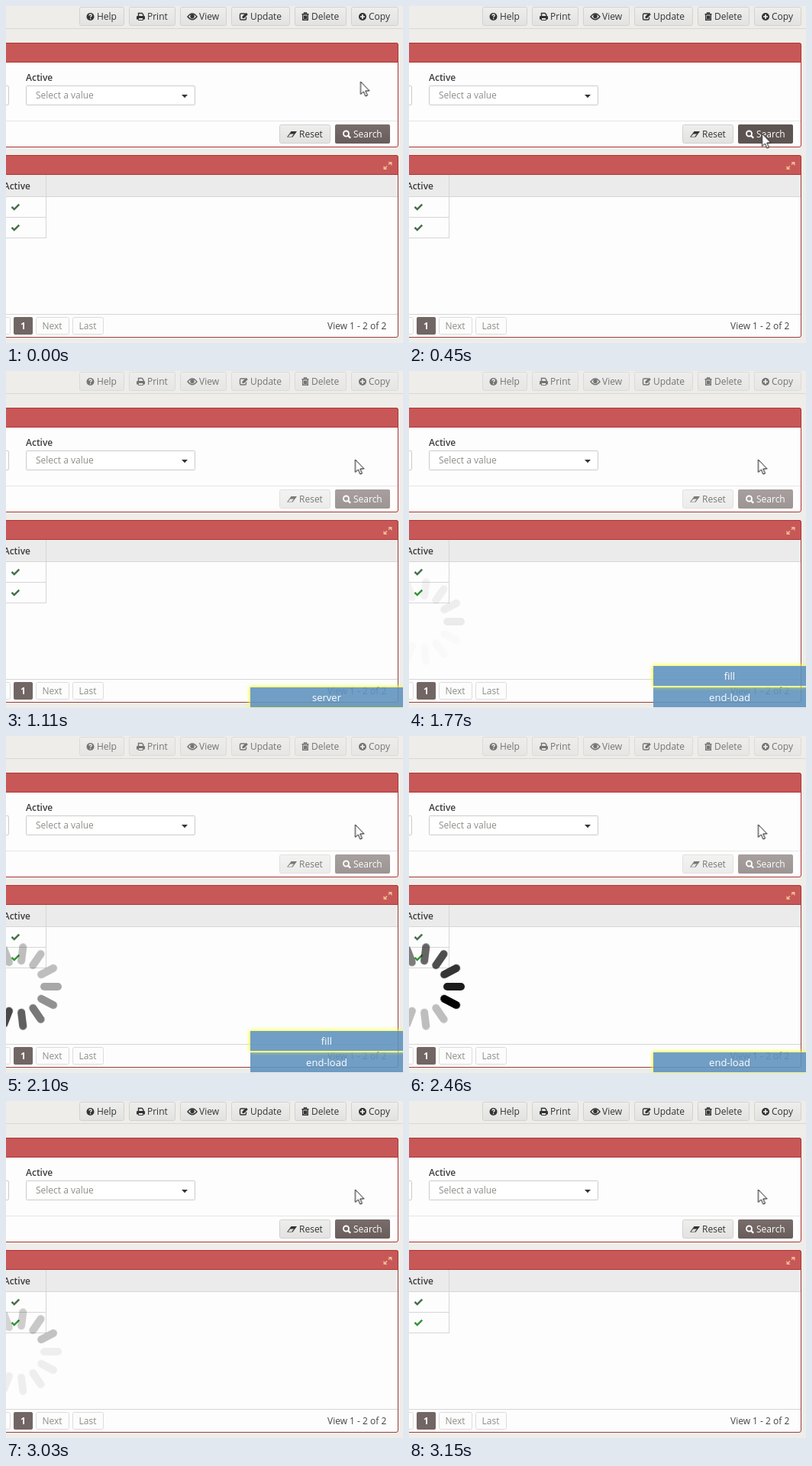
Recreate the animation shown at these times as an HTML page. Size 520 by 441 pixels, loop 3.9 s.

```html
<!DOCTYPE html>
<html lang="en">
<head>
<meta charset="utf-8">
<title>Grid search</title>
<style>
  html, body { margin: 0; width: 100%; height: 100%; overflow: hidden; background: #eeedea; }
  #stage { position: relative; width: 520px; height: 441px; overflow: hidden; }
  svg { position: absolute; left: 0; top: 0; }
  svg, .event { font: 12px "Open Sans", sans-serif; }

  .btn rect { fill: url(#light); stroke: #d2d1cf; }
  .btn, .ink { fill: #333; }
  .line { fill: none; stroke: #333; stroke-width: 1.4; }
  .bold { font-weight: 600; fill: #3c3c3c; }
  .muted { fill: #8b8f87; }
  .head { fill: #c75857; stroke: #b03434; }
  .rule { fill: none; stroke: #d6d6d6; }
  .check { fill: none; stroke: #466f49; stroke-width: 2.5; }
  .page { fill: #fcfcfc; stroke: #dcdcdc; }

  .lock, .hover, .cursor, .fresh, .event, .loader { animation: 3900ms step-end infinite; }
  .lock { animation-name: lock; }
  .hover { animation-name: hover; }
  .fresh { animation-name: fresh; }
  .cursor { animation-name: cursor; animation-timing-function: ease-in-out; }
  .loader { animation-name: loader; animation-timing-function: linear; }
  .loader rect { animation: spoke 650ms linear infinite; }

  .event {
    position: absolute; left: 320px; top: 414px; width: 200px; height: 26px;
    background: rgba(98, 148, 190, .9); color: #fff;
    font-size: 13px; line-height: 26px; text-align: center; visibility: hidden;
  }
  .glow { box-shadow: 0 0 5px 1px #ffff28; }
  .server { animation-name: server; }
  .fill { top: 386px; animation-name: fill; }
  .end { animation-name: end; }

  @keyframes lock { 0% { opacity: 1 } 12.3% { opacity: .65 } 73.07% { opacity: 1 } }
  @keyframes hover { 0% { fill: url(#dark) } 8% { fill: #5d5452 } 21.5% { fill: url(#dark) } }
  @keyframes fresh { 0% { stroke: #466f49 } 45.38% { stroke: #349536 } }
  @keyframes server { 0% { visibility: hidden } 12.3% { visibility: visible } 45.38% { visibility: hidden } }
  @keyframes fill { 0% { visibility: hidden } 45.38% { visibility: visible } 59.23% { visibility: hidden } }
  @keyframes end {
    0% { visibility: hidden; box-shadow: none }
    45.38% { visibility: visible; box-shadow: none }
    59.23% { visibility: visible; box-shadow: 0 0 5px 1px #ffff28 }
    73.07% { visibility: hidden; box-shadow: none }
  }
  @keyframes cursor {
    0%, .4% { transform: translate(464.5px, 99px) }
    11.5%, 18% { transform: translate(462.5px, 167px) }
    28.4%, 100% { transform: translate(457.5px, 116px) }
  }
  @keyframes loader { 0%, 44.87% { opacity: 0 } 52.5%, 70% { opacity: 1 } 80.2%, 100% { opacity: 0 } }
  @keyframes spoke { 0% { opacity: 1 } 60%, 100% { opacity: .25 } }
</style>
</head>
<body>
<div id="stage">
<svg width="520" height="441" viewBox="0 0 520 441">
  <defs>
    <linearGradient id="light" x2="0" y2="1"><stop stop-color="#eeeeed"/><stop offset="1" stop-color="#e2e2e1"/></linearGradient>
    <linearGradient id="dark" x2="0" y2="1"><stop stop-color="#786d6a"/><stop offset="1" stop-color="#685d5b"/></linearGradient>
  </defs>
  <rect width="520" height="441" fill="#eeedea"/>
  <path d="M0 29.5H520" stroke="#d9d8d5"/>

  <!-- toolbar -->
  <g class="lock">
    <g class="btn">
      <rect x="96.5" y="1.5" width="58" height="24" rx="2"/>
      <circle cx="110.5" cy="14" r="5"/>
      <path d="M108.9 12.6q.1-1.6 1.7-1.6t1.6 1.4q0 .8-.9 1.2-.7.4-.7 1.2M110.6 15.8v1.5" fill="none" stroke="#eee" stroke-width="1.3"/>
      <text x="119" y="18">Help</text>
    </g>
    <g class="btn">
      <rect x="161.5" y="1.5" width="60" height="24" rx="2"/>
      <path d="M171 14.2q0-1.2 1.2-1.2h8.6q1.2 0 1.2 1.2V17.500h-11z"/>
      <path class="line" d="M173.500 13V9.500h4.500l1.800 1.800V13" stroke-width="1.2"/>
      <path d="M173.500 15.500h6v3h-6z" fill="#eee" stroke="#333"/>
      <text x="185" y="18">Print</text>
    </g>
    <g class="btn">
      <rect x="228.500" y="1.500" width="60" height="24" rx="2"/>
      <path class="line" d="M238 14q6-8 12 0q-6 7.500-12 0z" stroke-width="1.2"/>
      <circle cx="244" cy="13.500" r="2.700"/>
      <text x="253" y="18">View</text>
    </g>
    <g class="btn">
      <rect x="295.500" y="1.500" width="76" height="24" rx="2"/>
      <path class="line" d="M313 10h-5q-1.500 0-1.500 1.500v5q0 1.500 1.500 1.500h5q1.500 0 1.500-1.500v-2" stroke-width="1.2"/>
      <path d="M309.500 16v-2.300l5-5 2.300 2.300-5 5z"/>
      <text x="320" y="18">Update</text>
    </g>
    <g class="btn">
      <rect x="378.500" y="1.500" width="67" height="24" rx="2"/>
      <path class="line" d="M387.500 10.700h9M390.500 10.500v-1.500h3v1.500M388.700 11v7.300h6.600V11M390.700 12.500v4.500M392.100 12.500v4.500M393.500 12.500v4.500" stroke-width="1"/>
      <text x="400" y="18">Delete</text>
    </g>
    <g class="btn">
      <rect x="452.500" y="1.500" width="61" height="24" rx="2"/>
      <circle cx="467" cy="14" r="5"/>
      <path d="M464 14h6M467 11v6" stroke="#eee" stroke-width="1.700"/>
      <text x="475" y="18">Copy</text>
    </g>
  </g>

  <!-- criteria -->
  <rect x="-9.500" y="48.500" width="523" height="136" rx="2.500" fill="#fdfdfd" stroke="#b03434"/>
  <path class="head" d="M-9 73.500V48.500H511q2.500 0 2.500 2.500v22.500z"/>
  <text class="bold" x="26" y="98">Active</text>
  <g fill="#fff" stroke="#cbcbcb">
    <rect x="-9.500" y="104.500" width="13" height="25" rx="1"/>
    <rect x="26.500" y="104.500" width="221" height="25" rx="1"/>
  </g>
  <text class="muted" x="39" y="121">Select a value</text>
  <path class="ink" d="M230 116h8l-4 4.200z"/>
  <path d="M0 150.500H513" stroke="#e6e6e6"/>
  <g class="lock">
    <g class="btn">
      <rect x="358.500" y="155.500" width="66" height="24" rx="2"/>
      <path d="M368 171.500l5.500-7.500h7.500l-5.500 7.500z"/>
      <path d="M369.500 171l2.700-3.600h4.800l-2.700 3.600z" fill="#ddd"/>
      <text x="384" y="172">Reset</text>
    </g>
    <rect class="hover" x="431" y="155" width="72" height="25" rx="2"/>
    <g fill="#fff">
      <circle cx="445.500" cy="167" r="3.500" fill="none" stroke="#fff" stroke-width="1.900"/>
      <path d="M448 169.600l3.200 3.200" stroke="#fff" stroke-width="2.200"/>
      <text x="455" y="172">Search</text>
    </g>
  </g>

  <!-- grid -->
  <rect x="-9.500" y="195.500" width="523" height="238" rx="2.500" fill="#fdfdfd" stroke="#99403c"/>
  <path d="M0 221H513V249H0z" fill="#ebebeb"/>
  <path class="head" d="M-9 220.500V195.500H511q2.500 0 2.500 2.500v22.500z"/>
  <g fill="#efbd94">
    <path d="M500.500 204h5v5zM499.500 214h-5v-5z"/>
    <path d="M496 212.500l3-3M501 207.500l3-3" stroke="#efbd94" stroke-width="1.600"/>
  </g>
  <path class="rule" d="M0 249.500H513M0 276.500H52.500M0 303.500H52.500M52.500 221V304M0 403.500H513"/>
  <text class="bold" x="32" y="240" text-anchor="end">Active</text>
  <path class="check" d="M7.500 262.800l3.300 3.300 6.400-6.400"/>
  <path class="check fresh" d="M7.500 289.800l3.300 3.300 6.400-6.400"/>
  <g class="page">
    <rect x="-9.500" y="407.500" width="15" height="22" rx="2"/>
    <rect x="39.500" y="407.500" width="43" height="22" rx="2"/>
    <rect x="87.500" y="407.500" width="40" height="22" rx="2"/>
  </g>
  <rect x="10" y="407" width="25" height="23" rx="2" fill="#71676a" style="fill:#716664"/>
  <text x="22.500" y="423" text-anchor="middle" fill="#fff" font-weight="700">1</text>
  <text class="muted" x="47.500" y="423">Next</text>
  <text class="muted" x="95.500" y="423">Last</text>
  <text x="421" y="423" fill="#444">View 1 - 2 of 2</text>

  <g class="loader" id="loader"></g>
</svg>

<div class="event glow server">server</div>
<div class="event end">end-load</div>
<div class="event glow fill">fill</div>

<svg width="520" height="441" viewBox="0 0 520 441">
  <path class="cursor" d="M0 0V16.500L3.800 13L6.400 19L9 18L6.400 12H11.500Z" fill="#fff" stroke="#111"/>
</svg>
</div>
<script>
  // Thirteen spokes, each lit 50 ms after its neighbour
  const loader = document.getElementById('loader'), spokes = 13;
  for (let i = 0; i < spokes; i++) {
    const bar = document.createElementNS('http://www.w3.org/2000/svg', 'rect');
    const attrs = { x: 29, y: -5, width: 28, height: 10, rx: 5,
      transform: `translate(16 328) rotate(${360 / spokes * i})` };
    for (const k in attrs) bar.setAttribute(k, attrs[k]);
    bar.style.animationDelay = `${50 * i - 845}ms`;
    loader.append(bar);
  }
</script>
</body>
</html>
```
